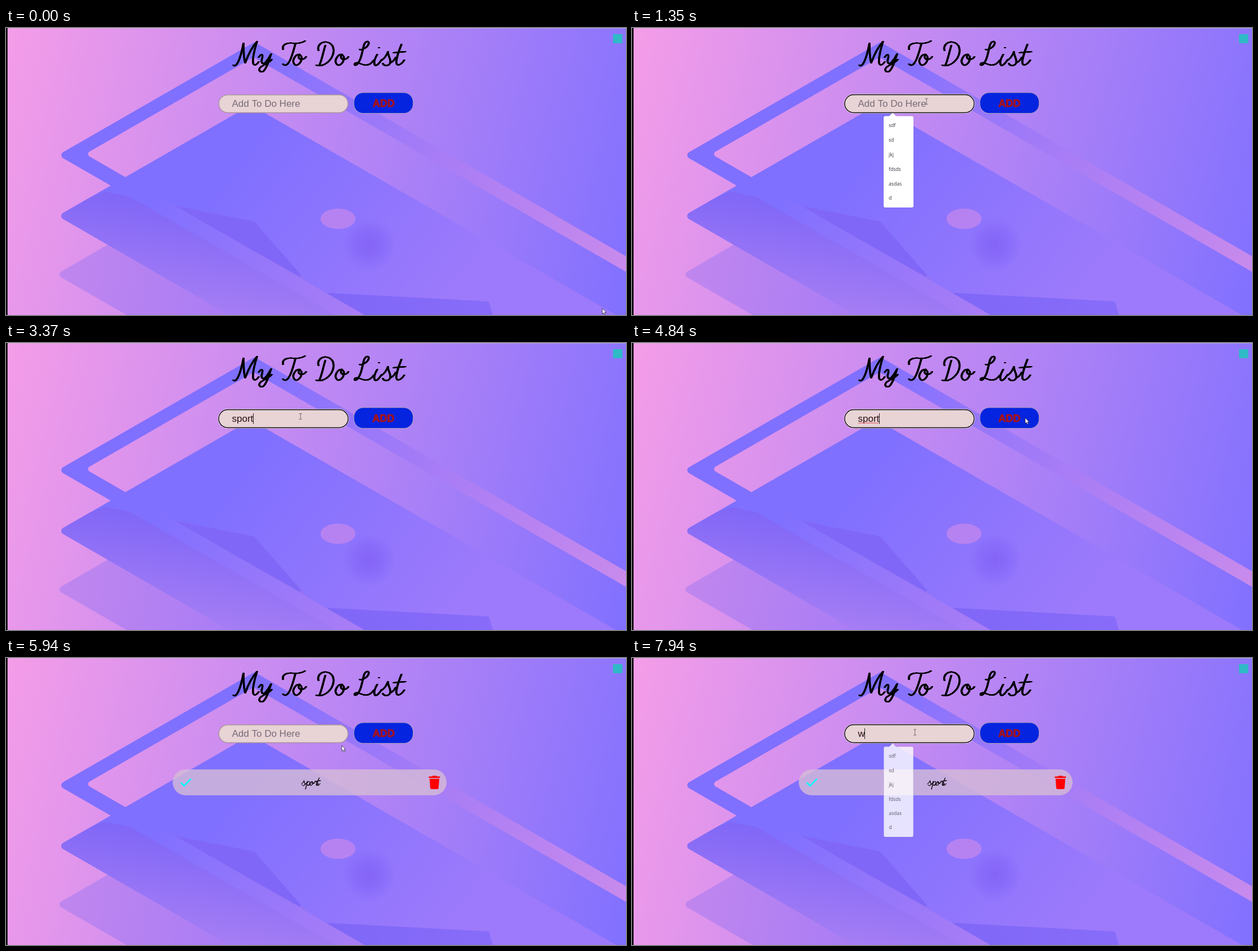
These frames come from a looping animation (1099 by 510 pixels, 8 s). An HTML page with a canvas:

```html
<!DOCTYPE html>
<html lang="en">
<head>
<meta charset="utf-8">
<title>My To Do List</title>
<style>
html, body { margin: 0; width: 100%; height: 100%; overflow: hidden; background: #000; }
canvas { display: block; width: 1099px; height: 510px; }
</style>
</head>
<body>
<canvas id="stage" width="1099" height="510" role="img" aria-label="My To Do List"></canvas>
<script>
const W = 1099, H = 510, LOOP = 8000, STEP = 70, BLINK = 530;
const ctx = document.getElementById('stage').getContext('2d');
const sans = '"Liberation Sans", Arial, sans-serif';

// Script letters: [left edge, centre lines], baseline at y = 66
const glyphs = {
  M: [402, 'M403 66 C408 71 415 58 421 27 C421 40 421 52 424 62 C429 48 436 34 445 24 C440 40 437 55 438 62 C439 68 444 66 448 60'],
  y: [448, 'M448 52 C453 45 456 46 454 54 C451 63 456 66 461 60 C465 55 468 50 470 46 C466 58 462 72 456 77 C450 80 446 74 452 69 C460 64 466 62 471 56'],
  T: [490, 'M491 38 C489 29 498 26 508 27 C518 28 524 27 530 23 M513 28 C509 42 506 56 500 63 C497 67 493 67 491 64'],
  o: [509, 'M521 47 C513 46 506 58 511 64 C515 70 524 62 524 53 C524 47 517 47 519 53 C521 57 528 57 532 51'],
  D: [549, 'M566 31 C562 44 560 56 556 65 M554 40 C551 30 560 24 568 25 C581 27 584 40 577 53 C570 64 559 69 550 66'],
  L: [617, 'M627 38 C631 40 642 34 643 27 C643 21 636 24 634 32 C631 45 629 58 622 65 C618 68 616 64 620 62 C627 60 634 70 645 64 C648 62 650 60 652 57'],
  i: [652, 'M658 47 C654 54 651 62 654 66 C658 68 662 62 666 56 M661 35 L661.5 35'],
  s: [665, 'M665 58 C671 54 675 48 677 42 C677 50 683 56 681 62 C679 68 670 68 668 63 M681 62 C686 60 689 56 691 52'],
  t: [686, 'M700 29 C695 42 690 55 691 62 C692 69 700 65 705 57 M686 44 L707 42'],
  p: [0, 'M1 59 C6 54 9 50 11 45 C8 58 4 72 1 84 M9 54 C14 44 24 43 22 54 C20 66 10 69 8 62 C14 69 22 64 27 57'],
  r: [0, 'M0 57 C4 54 6 50 7 44 C10 50 14 48 17 48 C14 54 11 62 14 66 C18 67 21 62 24 57']
};
for (const k in glyphs) glyphs[k][1] = new Path2D(glyphs[k][1]);

// A flat pen makes upright strokes heavier than level ones
function script(g, letters, baseline, scale, color, pen) {
  g.strokeStyle = color;
  g.lineCap = g.lineJoin = 'round';
  g.lineWidth = pen;
  for (const [ch, x] of letters) {
    const [left, path] = glyphs[ch];
    for (let d = -0.8; d <= 0.8; d += 0.4) {
      g.save();
      g.translate(x, baseline);
      g.scale(scale, scale);
      g.translate(d - left, -66);
      g.stroke(path);
      g.restore();
    }
  }
}

function ramp(g, x0, y0, x1, y1, colors) {
  const r = g.createLinearGradient(x0, y0, x1, y1);
  colors.forEach((c, i) => r.addColorStop(i / (colors.length - 1), c));
  return r;
}

function poly(path, pts, r = 0) {
  const n = pts.length, [a, b] = [pts[n - 1], pts[0]];
  path.moveTo((a[0] + b[0]) / 2, (a[1] + b[1]) / 2);
  pts.forEach((p, i) => path.arcTo(...p, ...pts[(i + 1) % n], r));
  path.closePath();
  return path;
}
const shape = (pts, r) => poly(new Path2D(), pts, r);

function pill(g, x, y, w, h, r, fill, line, width = 1) {
  g.beginPath();
  g.roundRect(x, y, w, h, r);
  if (fill) { g.fillStyle = fill; g.fill(); }
  if (line) { g.strokeStyle = line; g.lineWidth = width; g.stroke(); }
}

function paintBackdrop() {
  const c = document.createElement('canvas');
  c.width = W; c.height = H;
  const g = c.getContext('2d');
  const fill = (path, color) => { g.fillStyle = color; g.fill(path); };

  g.fillStyle = ramp(g, 0, 0, 1160, 290, ['#f59de8', '#8070ff']);
  g.fillRect(0, 0, W, H);

  fill(shape([[89, 438], [435, 238], [1000, 564], [654, 764]], 6),
    ramp(g, 95, 438, 390, 500, ['#c086ee', '#aa7df5']));

  const sheet = shape([[92, 334], [434, 136.7], [1234, 598], [892, 796]], 6);
  fill(sheet, ramp(g, 435, 200, 800, 480, ['#8070ff', '#9d7afb']));
  g.save();
  g.clip(sheet);
  fill(shape([[175, 291], [440, 344], [530, 447], [600, 520], [300, 520], [60, 334]], 2),
    ramp(g, 225, 300, 195, 490, ['#8067f7', '#a87ff4']));
  fill(shape([[440, 344], [530, 447], [300, 317]], 2), '#8167f7');
  fill(shape([[560, 470], [856, 486], [866, 520], [620, 520]], 4),
    ramp(g, 570, 470, 860, 500, ['#8067f7', '#886cf9']));
  const glow = g.createRadialGradient(643, 385, 4, 643, 385, 48);
  glow.addColorStop(0, 'rgba(132,100,246,.95)');
  glow.addColorStop(0.5, 'rgba(132,102,248,.6)');
  glow.addColorStop(1, 'rgba(132,104,250,0)');
  g.fillStyle = glow;
  g.fillRect(590, 330, 110, 110);
  g.restore();

  g.fillStyle = '#b682f1';
  g.beginPath();
  g.ellipse(588.5, 339, 31, 18, 0, 0, 7);
  g.fill();

  const frame = shape([[92, 226], [440.4, 25], [1240, 487], [892, 688]], 6);
  poly(frame, [[140.5, 224], [438.7, 52], [1239, 514], [940, 686]], 5);
  g.fillStyle = ramp(g, 329, 190, 1006, 581, ['#8070ff', '#a77cf6', '#c88aec']);
  g.fill(frame, 'evenodd');

  g.fillStyle = 'rgba(200,190,205,.6)';
  g.fillRect(0, 0, W, 1);
  g.fillStyle = '#000';
  g.fillRect(0, 0, 2.7, H);
  g.fillStyle = '#2fbac6';
  g.fillRect(1076, 11, 16.5, 16);

  script(g, [['M', 402], ['y', 448], ['T', 490], ['o', 509], ['D', 549], ['o', 584],
    ['L', 617], ['i', 652], ['s', 665], ['t', 687]], 66, 1, '#000', 2.1);
  return c;
}
const backdrop = paintBackdrop();

const typed = [[0, ''], [820, ''], [1810, 's'], [2210, 'sp'], [2420, 'spo'], [3170, 'spor'],
  [3370, 'sport'], [5180, ''], [6420, ''], [7940, 'w']];
const listAll = ['sdf', 'sd', 'jkj', 'fdsds', 'asdas', 'd'];
const listS = ['sd', 'sdf', 's', 'sdds', 'sds'];
const menus = [
  { from: 790, fade: 9e3, to: 1810, items: listAll, w: 53 },
  { from: 1600, show: 1810, fade: 2210, to: 2420, items: listS, w: 44 },
  { from: 6410, fade: 7940, to: 8000, items: listAll, w: 53 }
];
const moves = [[70, 1057, 498], [700, 522, 130.5], [4200, 522, 130.5], [4700, 705, 147],
  [4840, 697, 133], [5110, 697, 133], [5450, 688, 135], [5740, 688, 135],
  [5940, 614, 160], [6210, 501.5, 132]];

function pointerAt(t) {
  const i = moves.findIndex(m => m[0] > t);
  if (i === 0) return moves[0].slice(1);
  if (i < 0) return moves[moves.length - 1].slice(1);
  const [t0, x0, y0] = moves[i - 1], [t1, x1, y1] = moves[i];
  const q = Math.min(1, Math.ceil((t - t0 + 1) / STEP) * STEP / (t1 - t0));
  const k = q * q * (3 - 2 * q);
  return [x0 + (x1 - x0) * k, y0 + (y1 - y0) * k];
}

function drawPointer(t) {
  const [x, y] = pointerAt(t);
  ctx.save();
  ctx.translate(x, y);
  ctx.lineWidth = 0.8;
  ctx.lineCap = 'butt';
  ctx.lineJoin = 'miter';
  if (x > 377 && x < 607 && y > 118 && y < 151) {
    ctx.strokeStyle = '#57504f';
    ctx.stroke(new Path2D('M0 -4.5 V4.5 M-2.5 -5 H2.5 M-2.5 5 H2.5'));
  } else {
    const arrow = new Path2D('M0 0 V10 L2.2 8 L3.9 11.6 L5.5 10.8 L3.9 7.3 H6.8 Z');
    ctx.fillStyle = '#fff';
    ctx.fill(arrow);
    ctx.strokeStyle = '#2a2440';
    ctx.stroke(arrow);
  }
  ctx.restore();
}

function drawField(t, focus) {
  if (focus) {
    pill(ctx, 376, 117.5, 231.5, 34, 17, null, 'rgba(255,255,255,.8)', 1);
    pill(ctx, 377, 118.5, 229.5, 32, 16, '#e8d3d5', '#0a0808', 1.4);
  } else {
    pill(ctx, 377.2, 118.7, 229, 31.8, 16, '#e8d3d5', '#a8929d', 1.4);
  }
  const [since, text] = typed.filter(e => e[0] <= t).pop();
  ctx.font = '17px ' + sans;
  ctx.textAlign = 'left';
  ctx.fillStyle = text ? '#2a0f10' : '#776c77';
  ctx.fillText(text || 'Add To Do Here', 400.5, 140);
  const end = 400.5 + ctx.measureText(text).width;
  if (focus && Math.floor((t - since) / BLINK) % 2 === 0) {
    ctx.fillStyle = '#222';
    ctx.fillRect(Math.floor(end), 125, 1, 19);
  }
  if (text === 'sport' && t >= 4300) {
    ctx.strokeStyle = '#e0283c';
    ctx.lineWidth = 0.9;
    ctx.beginPath();
    for (let x = 401, i = 0; x <= end; x += 1.5, i++) ctx.lineTo(x, 141.5 + i % 2 * 1.5);
    ctx.stroke();
  }
}

function drawButton(focus) {
  pill(ctx, 616.7, 114.8, 105, 36.9, 16.5, '#0524e0', '#b3a2b4', 1);
  ctx.font = 'bold 18px ' + sans;
  ctx.textAlign = 'center';
  ctx.fillStyle = ctx.strokeStyle = '#a5131d';
  ctx.lineWidth = 0.9;
  const x = focus ? 669 : 669.5;
  ctx.fillText('ADD', x, 140);
  ctx.strokeText('ADD', x, 140);
}

function drawItem() {
  pill(ctx, 295.5, 198, 485.5, 46, 23, 'rgba(214,188,214,.8)');
  ctx.strokeStyle = '#00ffff';
  ctx.lineWidth = 2.7;
  ctx.lineCap = 'butt';
  ctx.lineJoin = 'miter';
  ctx.stroke(new Path2D('M309.8 221.3 L315.8 227.2 L328 214.6'));
  script(ctx, [['s', 524], ['p', 530.5], ['o', 538.5], ['r', 545.5], ['t', 550]], 226.5, 0.36, '#1c141c', 1.7);
  ctx.fillStyle = '#ff0000';
  ctx.fill(new Path2D('M749.5 210.6 H755 L756 209.2 H763 L764 210.6 H769.2 V213.2 H749.5 Z'));
  ctx.fill(new Path2D('M750.8 214.8 H768 L766.8 231 Q766.6 233 764.6 233 H754.2 Q752.2 233 752 231 Z'));
}

function drawMenu(t, m) {
  if (t < (m.show || m.from) || t >= m.to) return;
  const alpha = t < m.fade
    ? Math.min(1, (t - m.from + STEP) / 140)
    : 0.8 - 0.28 * Math.floor((t - m.fade) / STEP);
  if (alpha <= 0) return;
  const x = 446, y = 156.5, h = 7.6 + m.items.length * 25.8;
  const cx = x + m.w / 2, cy = y + h / 2, k = 1 - 0.06 * (1 - alpha);
  ctx.save();
  ctx.globalAlpha = alpha;
  ctx.translate(cx, cy);
  ctx.scale(k, k);
  ctx.translate(-cx, -cy);
  pill(ctx, x, y, m.w, h, 3, null, 'rgba(60,40,130,.25)', 1);
  const box = new Path2D('M455.5 157 L462 150.8 L468.5 157 Z');
  box.roundRect(x, y, m.w, h, 3);
  ctx.fillStyle = '#fff';
  ctx.fill(box);
  ctx.font = '8.6px "Open Sans", "Noto Sans", sans-serif';
  ctx.textAlign = 'left';
  ctx.fillStyle = '#38323e';
  m.items.forEach((s, i) => ctx.fillText(s, 455, 176.3 + i * 25.8));
  ctx.restore();
}

function draw(t) {
  const focus = (t >= 790 && t < 5110) || t >= 6410;
  ctx.drawImage(backdrop, 0, 0);
  drawField(t, focus);
  drawButton(focus);
  if (t >= 5180) drawItem();
  for (const m of menus) drawMenu(t, m);
  drawPointer(t);
}

const start = performance.now();
function tick() {
  draw((performance.now() - start) % LOOP);
  requestAnimationFrame(tick);
}
tick();
</script>
</body>
</html>
```
